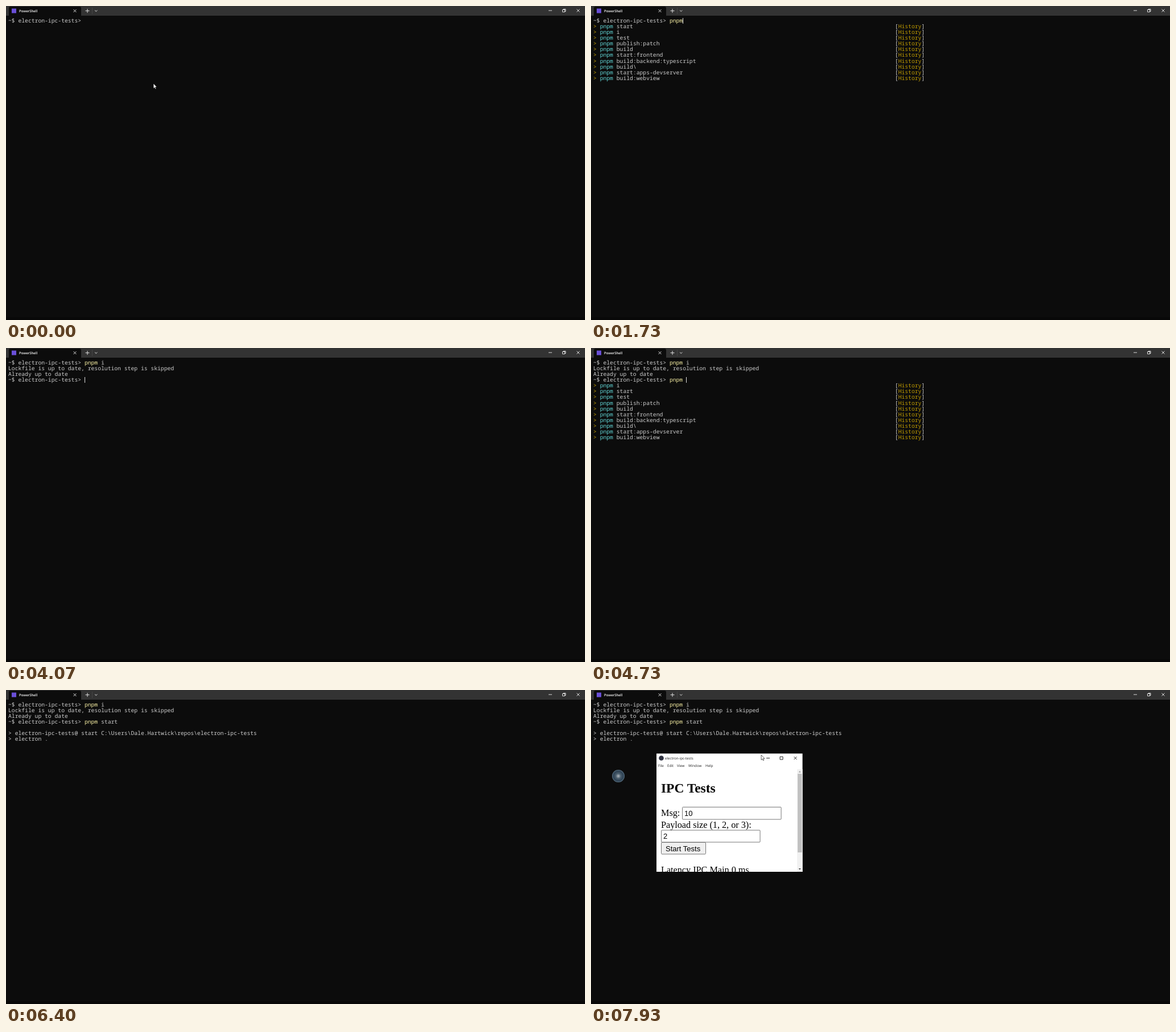
Write an HTML page that moves like this. It is 1017 by 551 pixels and loops after 8 s.

```html
<!DOCTYPE html>
<html lang="en">
<head>
<meta charset="utf-8">
<title>Terminal session</title>
<style>
  html, body { margin: 0; width: 100%; height: 100%; overflow: hidden; background: #0c0c0c; }
  svg.stage, pre, #caret { position: absolute; left: 0; top: 0; }
  pre { left: 4px; top: 21px; margin: 0; color: #ccc; font: 9.717px/10.08px "Noto Sans Mono", monospace; font-variant-ligatures: none; text-rendering: geometricPrecision; }
  pre .cmd { color: #f9f1a5; }
  pre .hit { color: #61d6d6; }
  pre .tag { color: #c19c00; }
  #caret { width: 1px; height: 10px; background: #ddd; }
  .ui { font: 6.2px "Open Sans", sans-serif; text-rendering: geometricPrecision; }
  .serif { font: 16.2px "Liberation Serif", serif; }
  .field { font: 13px "Liberation Sans", sans-serif; }
</style>
</head>
<body>
<svg class="stage" width="1017" height="551">
  <rect width="1017" height="17" fill="#333"/>
  <path d="M5 17V4q0-3 3-3H129q3 0 3 3V17Z" fill="#0c0c0c"/>
  <rect y="546" width="1017" height="5" fill="#080808"/>
  <rect x="10" y="4.500" width="8" height="8" fill="#6a4fd8"/>
  <text class="ui" x="23" y="11" fill="#fff" style="font-size:6px;font-weight:600">PowerShell</text>
  <path d="M118.500 6l5 5m0-5l-5 5M139.500 8.500h7m-3.500-3.500v7M156 7.500l2.200 2 2.200-2M953 8h6M977.500 6.500h4v4h-4zM979 6.500v-1h4v4h-1.500M1002.500 5.500l5 5m0-5l-5 5"
        fill="none" stroke="#eee" stroke-width=".9"/>
  <path d="M151.500 3V14" stroke="#444"/>
</svg>
<pre id="term"></pre>
<div id="caret"></div>
<svg class="stage" width="1017" height="551">
  <defs>
    <radialGradient id="glow">
      <stop offset="0" stop-color="#b4bac0"/>
      <stop offset=".4" stop-color="#4a5d6c"/>
      <stop offset=".8" stop-color="#2c4052"/>
      <stop offset="1" stop-color="#5b7283"/>
    </radialGradient>
  </defs>
  <circle id="ripple" cx="48" cy="151" r="11" fill="url(#glow)"/>
  <g id="app">
    <svg x="115" y="111.500" width="256.500" height="207.500" viewBox="115 111.500 256.500 207.500">
      <rect x="115" y="111" width="257" height="209" fill="#fff"/>
      <circle cx="123.500" cy="119.500" r="4.300" fill="#2f3241"/>
      <g class="ui" fill="#222">
        <text x="130" y="122">electron-ipc-tests</text>
        <text x="118" y="135">File</text>
        <text x="134" y="135">Edit</text>
        <text x="151" y="135">View</text>
        <text x="171" y="135">Window</text>
        <text x="201" y="135">Help</text>
      </g>
      <path d="M308 119.500h6M332 117h5v5h-5zM356.500 117l5 5m0-5l-5 5" fill="none" stroke="#111" stroke-width=".9"/>
      <rect x="362" y="139" width="10" height="180" fill="#f1f1f1"/>
      <rect x="363" y="147" width="7.500" height="138" fill="#c1c1c1"/>
      <path d="M364.700 144.500h4l-2-2.500z" fill="#999"/>
      <path d="M364.700 313h4l-2 2.500z" fill="#444"/>
      <g class="serif">
        <text x="123" y="180" style="font-size:23.4px;font-weight:700">IPC Tests</text>
        <text x="123" y="221">Msg:</text>
        <text x="123" y="242">Payload size (1, 2, or 3):</text>
        <text x="123" y="321">Latency IPC Main 0 ms</text>
      </g>
      <g fill="#fff" stroke="#767676">
        <rect x="160.500" y="205.500" width="173.500" height="21.500" rx="1"/>
        <rect x="123.500" y="246" width="173.500" height="21" rx="1"/>
        <rect x="123.500" y="267.500" width="78" height="20.500" rx="1.500" fill="#efefef"/>
      </g>
      <g class="field">
        <text x="164" y="221">10</text>
        <text x="127" y="261">2</text>
        <text x="131" y="282.500">Start Tests</text>
      </g>
    </svg>
  </g>
  <path id="mouse" d="M0 0V8.700L2 6.900 3.300 9.800 4.700 9.200 3.400 6.300H6Z" fill="#fff" stroke="#000" stroke-width=".6"/>
</svg>
<script>
const $ = id => document.getElementById(id);
const LOOP = 8000, FRAME = 1000 / 15, CELL = 5.83, ROW = 10.08;
const PROMPT = '~$ electron-ipc-tests&gt; ', PROMPT_LEN = 23;

const span = (kind, s) => `<span class="${kind}">${s}</span>`;
const typed = s => PROMPT + s.replace(/^\S+/, w => span('cmd', w));

// Suggestion lists: each entry follows "pnpm "
const recent = 'start|i|test|publish:patch|build|start:frontend|build:backend:typescript|build\\|start:apps-devserver|build:webview'.split('|');
const recent2 = ['i', 'start', ...recent.slice(2)];
const installs = 'install|i electron|i -D typescript|init|i ws|info electron|i esbuild|install --force|i --offline'.split('|');
const sList = 'start|start:frontend|start:apps-devserver|store prune|start:electron|start:electron:debug|setup|store path|server|start:apps-devsever'.split('|');
const starts = 'frontend|apps-devserver|electron|electron:debug|apps-devsever|extensionapp-devserver|electron\\|frontne|backend|viewer'
  .split('|').map(s => 'start:' + s);
const stList = ['start', ...starts.slice(0, 9)];

const installed = [typed('pnpm i'), 'Lockfile is up to date, resolution step is skipped', 'Already up to date'];
const started = [...installed, typed('pnpm start')];
const running = [...started, '', '&gt; electron-ipc-tests@ start C:\\Users\\Dale.Hartwick\\repos\\electron-ipc-tests', '&gt; electron .'];

// [time, finished lines, input (null: no prompt), suggestions, caret shown]
const screens = [
  [0, [], '', [], false],
  [530, [], '', [], true],
  [1070, [], '', [], false],
  [1330, [], 'p', recent, true],
  [1530, [], 'pn', recent, true],
  [1670, [], 'pnp', recent, true],
  [1730, [], 'pnpm', recent, true],
  [1930, [], 'pnpm ', recent, true],
  [2130, [], 'pnpm i', installs.slice(0, 5), true],
  [2730, [], 'pnpm i', installs, false],
  [2870, installed.slice(0, 1), null, [], true],
  [3330, installed, null, [], true],
  [3470, installed, '', [], false],
  [4070, installed, '', [], true],
  [4200, installed, 'p', recent2, true],
  [4400, installed, 'pn', recent2, true],
  [4530, installed, 'pnp', recent2, true],
  [4600, installed, 'pnpm', recent2, true],
  [4730, installed, 'pnpm ', recent2, true],
  [4870, installed, 'pnpm s', sList, true],
  [5070, installed, 'pnpm st', stList, true],
  [5130, installed, 'pnpm sta', stList, true],
  [5270, installed, 'pnpm star', stList, true],
  [5330, installed, 'pnpm start', starts, true],
  [5530, started, null, [], true],
  [5930, running, null, [], false]
];

// Mouse: visible from show until hide, moving between from and to
const mouseMoves = [
  { show: 0, hide: 1330, path: [67, 267, 259, 136, 351, 155] },
  { show: 6000, hide: 6400, path: [6000, 6333, 351, 155, 6, 261] },
  { show: 7800, hide: LOOP + FRAME, path: [7800, 7933, 52, 151, 299, 114] }
];
const appPath = [7800, 7933, -276, 44, 0, 0];

const suggestion = (name, hits) => {
  const s = 'pnpm ' + name;
  return span('tag', '&gt;') + ' ' + span('hit', s.slice(0, hits)) + s.slice(hits).padEnd(89 - hits) +
    '[' + span('tag', 'History') + ']';
};

function place(el, t, [from, to, x0, y0, x1, y1]) {
  const k = Math.max(0, Math.min(1, (t - from) / (to - from)));
  el.setAttribute('transform', `translate(${x0 + (x1 - x0) * k} ${y0 + (y1 - y0) * k})`);
}

const show = (el, on) => { el.style.visibility = on ? 'visible' : 'hidden'; };

let current;
function drawScreen(screen) {
  if (screen === current) return;
  current = screen;
  const [, done, input, list, caretOn] = screen;
  const lines = [...done];
  if (input !== null) lines.push(typed(input));
  lines.push(...list.map(name => suggestion(name, input.length)));
  $('term').innerHTML = lines.join('\n');
  const col = input === null ? 0 : PROMPT_LEN + input.length;
  $('caret').style.transform = `translate(${Math.round(4 + col * CELL)}px, ${Math.round(21 + done.length * ROW)}px)`;
  show($('caret'), caretOn);
}

const begin = performance.now();
function draw() {
  // The picture advances 15 times per second
  const t = Math.floor(((performance.now() - begin) % LOOP + 5) / FRAME) * FRAME;
  const now = t + 5;
  drawScreen(screens.findLast(s => s[0] <= now));

  const move = mouseMoves.find(m => now >= m.show && now < m.hide);
  show($('mouse'), move);
  if (move) place($('mouse'), t, move.path);

  show($('app'), now >= 7800);
  place($('app'), t, appPath);
  show($('ripple'), now >= 7930);
  requestAnimationFrame(draw);
}
draw();
</script>
</body>
</html>
```
